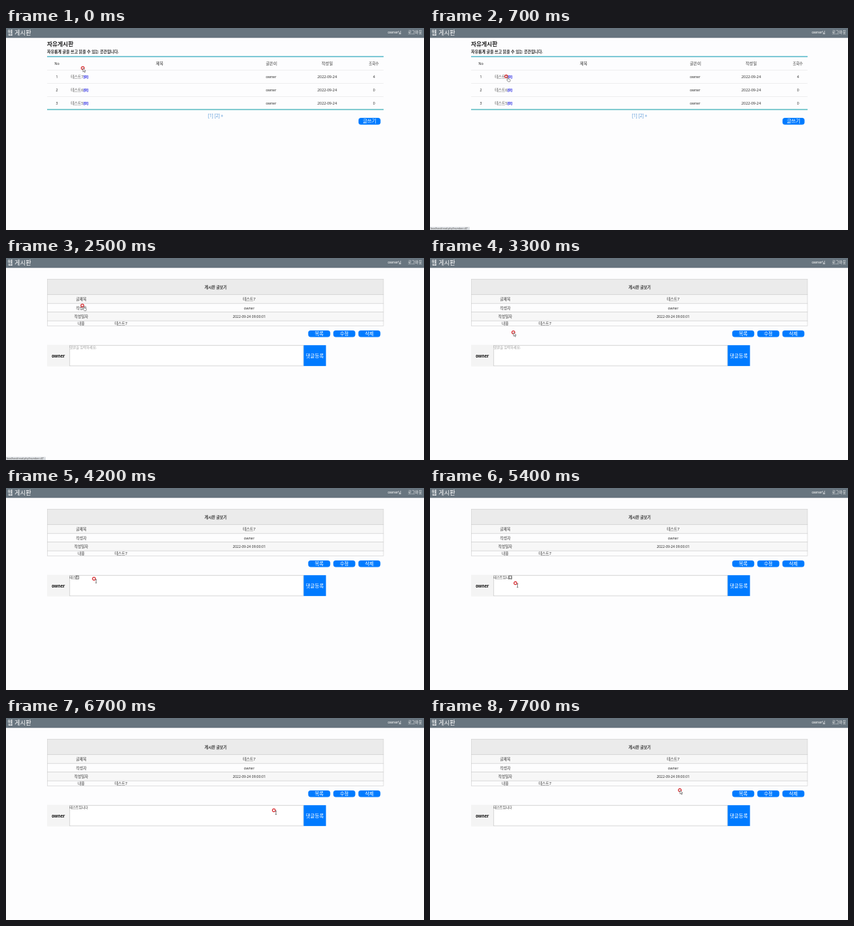
An HTML page for the animation above (8 s loop, 600 by 290 pixels).

```html
<!DOCTYPE html>
<html lang="ko">
<head>
<meta charset="utf-8">
<style>
html, body { margin: 0; width: 100%; height: 100%; overflow: hidden; background: #fdfdfe; }
svg { display: block; width: 600px; height: 290px; font-family: "Noto Sans", "Noto Sans CJK KR", "Noto Sans CJK", sans-serif; }
text { white-space: pre; }
</style>
</head>
<body>
<svg id="stage" viewBox="0 0 600 290" xmlns="http://www.w3.org/2000/svg"></svg>
<script>
const NS = "http://www.w3.org/2000/svg";
const LOOP = 8000, STEP = 100;
const BLUE = "#007bff", DARK = "#0a519f", INK = "#333";
const stage = document.getElementById("stage");

function add(parent, tag, attrs, content) {
  const el = document.createElementNS(NS, tag);
  for (const k in attrs) el.setAttribute(k, attrs[k]);
  if (content !== undefined) el.textContent = content;
  parent.appendChild(el);
  return el;
}
const group = (parent = stage) => add(parent, "g", {});
const box = (p, x, y, width, height, fill, more = {}) =>
  add(p, "rect", { x, y, width, height, fill, ...more });
const text = (p, x, y, size, str, more = {}) =>
  add(p, "text", { x, y, "font-size": size, fill: INK, ...more }, str);
const mid = (p, x, y, size, str, more = {}) =>
  text(p, x, y, size, str, { "text-anchor": "middle", ...more });
const bold = { "font-weight": 700 };
const white = { fill: "#fff" };

function pill(p, x, y, h, label) {
  box(p, x, y, 31.6, h, BLUE, { rx: 3.6 });
  mid(p, x + 15.8, y + h / 2 + 2.5, 7, label, white);
}

// header bar
box(stage, 0, 0, 600, 290, "#fdfdfe");
box(stage, 0, 0, 600, 14.2, "#68757f");
text(stage, 2, 9.6, 8.7, "웹 게시판", white);
text(stage, 548, 8.4, 5.1, "owner님", white);
text(stage, 577, 8.4, 5.5, "로그아웃", white);

// list page
const list = group();
text(list, 59, 25.6, 8.2, "자유게시판", { ...bold, fill: "#222" });
text(list, 59, 36.2, 5.6, "자유롭게 글을 쓰고 읽을 수 있는 공간입니다.", { ...bold, fill: "#222" });
[60.3, 79.3, 98].forEach(y => box(list, 59, y, 483, 0.6, "#e6e6e8"));
box(list, 59, 40.4, 483, 1.3, "#3fb0c4");
box(list, 59, 116.4, 483, 1.3, "#45b3bb");
[[73, 5.3, "No"], [220.5, 5.8, "제목"], [381, 5.8, "글쓴이"], [461, 5.8, "작성일"], [528, 5.2, "조회수"]]
  .forEach(([x, size, s]) => mid(list, x, 53, size, s));
[[7, 4], [6, 0], [5, 0]].forEach(([n, views], i) => {
  const y = 72 + i * 18.8;
  mid(list, 73, y, 5.2, i + 1);
  text(list, 93, y, 5.4, "테스트" + n, { fill: "#555" });
  text(list, 111.3, y, 5.4, "[0]", { ...bold, fill: "#1414e0" });
  mid(list, 380.5, y, 5.1, "owner");
  mid(list, 461, y, 5.35, "2022-09-24");
  mid(list, 528.3, y, 5.2, views);
});
text(list, 290, 127.7, 6.2, "[1] [2] »", { fill: "#5b9bd8" });
pill(list, 506, 129, 9.8, "글쓰기");

// post page
const post = group();
const rows = [30.3, 52.6, 65.2, 77.6, 90.2, 97.4];
["#ebebeb", "#f7f7f7", "#fdfdfe", "#f7f7f7", "#fdfdfe"].forEach((fill, i) =>
  box(post, 59.3, rows[i], 482.6, rows[i + 1] - rows[i], fill, { stroke: "#cfcfcf", "stroke-width": 0.6 }));
mid(post, 301, 43.8, 5.5, "게시판 글보기", bold);
[["글제목", "테스트7", 5.4], ["작성자", "owner", 5.1], ["작성일자", "2022-09-24 09:00:01", 5]]
  .forEach(([label, value, size], i) => {
    const y = 60.9 + i * 12.6;
    mid(post, 108, y, 5.5, label);
    mid(post, 349, y, size, value);
  });
mid(post, 108, 95.9, 5.4, "내용");
text(post, 156, 95.9, 5.4, "테스트7");
["목록", "수정", "삭제"].forEach((s, i) => pill(post, 433.8 + i * 36, 104, 9.4, s));

// comment form
box(post, 59, 124.6, 32, 31, "#f4f4f4");
mid(post, 75, 143, 6.1, "owner", { ...bold, fill: "#111" });
box(post, 91.3, 125.3, 335.7, 29.6, "#fff", { stroke: "#c8c8c8", "stroke-width": 0.7 });
const hint = text(post, 91.3, 129.7, 4.95, "댓글을 입력하세요.", { fill: "#999" });
const typed = text(post, 91.3, 129.7, 4.8, "");
const compose = box(post, 0, 126, 4.3, 4.8, "none", { stroke: "#333", "stroke-width": 0.5 });
const submit = box(post, 427.3, 125.2, 32, 29.9, BLUE);
mid(post, 443.2, 143, 7, "댓글등록", white);

// link preview
const status = group();
box(status, 0, 285.6, 57, 4.4, "#dadde1");
text(status, 0.8, 289.2, 3.6, "localhost/read.php?number=47", { fill: "#555" });

// pointer
const pointer = group();
const ring = add(pointer, "circle", { r: 2.1, fill: "none", "stroke-width": 1.3 });
const line = { stroke: "#333", "stroke-width": 0.5, fill: "#fff" };
const shapes = {
  arrow: add(pointer, "path", { d: "M.3 .3v5.2l1.3-1.1 1 2 .8-.4-.9-1.9h1.7z", ...line }),
  hand: add(pointer, "path", { d: "M1.8 1.6q.7-.7 1.2 0v2l2 .5q.9.3.8 1.2l-.5 2.2h-2.6l-1.9-2.6q.1-.7 1 0z", ...line }),
  beam: add(pointer, "path", { d: "M2 1h2M3 1v5M2 6h2", ...line, fill: "none", "stroke-width": 0.6 })
};

const path = [
  [0, 110.2, 57.5], [300, 107, 63], [700, 109.4, 69.5], [1500, 109.4, 69.5],
  [2100, 109.6, 68.2], [2700, 109.6, 68.2], [3100, 116, 94], [3600, 126.3, 130.3],
  [5300, 126.3, 130.3], [5400, 122.6, 136.6], [5600, 185, 170], [5800, 355, 184],
  [6000, 490, 170], [6200, 447.8, 144], [6500, 447.8, 144], [6700, 384.5, 132.5],
  [7000, 384.5, 132.5], [7400, 355, 107.5], [7600, 355, 107.5], [7700, 358.6, 103.6],
  [8000, 358.6, 103.6]
];
const smooth = u => u * u * (3 - 2 * u);

function place(t) {
  let i = 0;
  while (i < path.length - 2 && t >= path[i + 1][0]) i++;
  const a = path[i], b = path[i + 1];
  const u = (t - a[0]) / (b[0] - a[0]);
  const fast = t > 5400 && t < 6200;
  const k = fast ? u : smooth(u);
  return [a[1] + (b[1] - a[1]) * k, a[2] + (b[2] - a[2]) * k];
}

const typing = [
  [3800, "테"], [3900, "테ㅅ"], [4000, "테스"], [4100, "테슽"], [4200, "테스트"],
  [4400, "테스트ㅇ"], [4500, "테스트이"], [4600, "테스트입"], [4800, "테스트입ㄴ"],
  [4900, "테스트입니"], [5100, "테스트입니다"]
];
const show = (el, on) => el.setAttribute("display", on ? "inline" : "none");
const inside = (x, y, l, t, r, b) => x > l && x < r && y > t && y < b;

function draw(time) {
  const t = Math.floor(time / STEP) * STEP;
  const [x, y] = place(t);
  const onPost = t >= 2500;
  show(list, !onPost);
  show(post, onPost);

  let str = "";
  for (const [at, s] of typing) if (t >= at) str = s;
  typed.textContent = str;
  show(hint, !str);
  show(compose, str && t < 6200);
  compose.setAttribute("x", 91.3 + (str.length - 1) * 4.42);

  const onLink = !onPost && inside(x, y, 92, 65, 119, 75);
  const onButton = onPost && inside(x, y, 427, 125, 459, 155);
  const inField = onPost && inside(x, y, 91, 125, 427, 155);
  submit.setAttribute("fill", onButton ? DARK : BLUE);
  show(status, onLink || (onPost && t < 3000));

  const kind = onLink || onButton || t === 2500 ? "hand" : inField ? "beam" : "arrow";
  for (const k in shapes) show(shapes[k], k === kind);
  ring.setAttribute("stroke", onButton && t < 6300 ? "#4d9bf0" : "#d9363a");
  pointer.setAttribute("transform", `translate(${x.toFixed(2)} ${y.toFixed(2)})`);
}

const start = performance.now();
function tick() {
  draw((performance.now() - start) % LOOP);
  requestAnimationFrame(tick);
}
tick();
</script>
</body>
</html>
```
